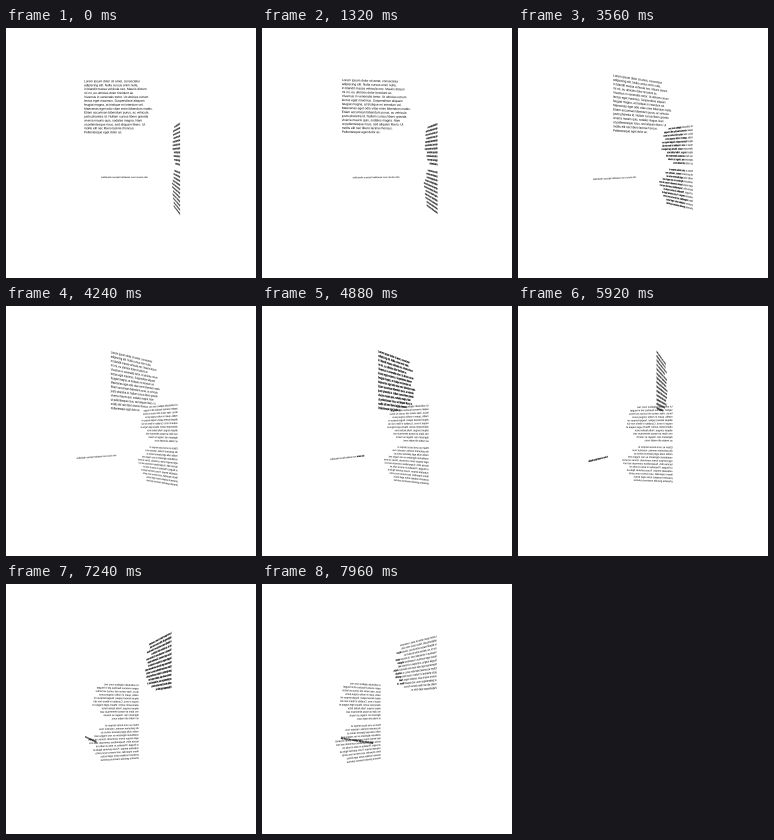
An HTML page with a canvas for the animation above (8 s loop, 250 by 250 pixels).

```html
<!DOCTYPE html>
<html lang="la">
<head>
<meta charset="utf-8">
<title>Turning text planes</title>
<style>
  html, body { margin: 0; width: 100%; height: 100%; overflow: hidden; background: #fff; }
  canvas { display: block; width: 250px; height: 250px; }
</style>
</head>
<body>
<canvas id="stage"></canvas>
<script>
const SIZE = 250, LOOP = 8000, STEP = 40;
const CENTER = { x: 127, y: 125 }, PERSPECTIVE = 310;
const EM = 100, OVERSAMPLE = 4;

const intro = `Lorem ipsum dolor sit amet, consectetur
adipiscing elit. Nulla cursus enim nulla,
in blandit massa vehicula nec. Mauris dictum
mi mi, eu ultricies dolor tincidunt ac.
Vivamus in venenatis tortor. Ut ultricies rutrum
lectus eget maximus. Suspendisse aliquam
feugiat magna, at tristique mi interdum vel.
Maecenas eget odio vitae enim bibendum mattis.
Etiam accumsan bibendum purus, ac vehicula
justo pharetra id. Nullam cursus libero gravida
viverra mauris quis, sodales magna. Nam
ut pellentesque risus, sed aliquam libero. Ut
mollis elit nec libero lacinia rhoncus.
Pellentesque eget dolor ac.`;

const body = `Ut sollicitudin dapibus nunc nec
sapien vivamus faucibus elit in feugiat
lacus, vitae varius nisl cursus eu lectus
mattis, quam in mollis congue purus
aliquet laoreet sapien, feugiat tempus mi
neque in eros. Curabitur in libero non dui
ullamcorper auctor. Mauris eget magna et
aliquet congue. Nulla facilisi tortor
nec diam at massa elementum sed
dignissim nisi. Integer ac mauris
ac mattis elit mattis nunc.

Etiam ac urna luctus tempor et
dis parturient montes, nascetur mus
mollis nulla eget placerat varius ac
vestibulum dignissim ex nec magna sed
eget tempor lorem commodo. Donec sit amet
lacinia nibh. Suspendisse commodo sed orci
ut feugiat. Phasellus in ante et nulla mi
vulputate tempor. Fusce pulvinar ligula at
libero imperdiet, sed viverra nunc porta
praesent sodales tortor eget lectus
pharetra gravida maximus pulvinar.`;

const label = "sollicitudin suscipit habitasse nunc iaculis odio";

// Each plane starts at (x, y, z); its lines run along direction (dx, dz).
const planes = [
  { text: body,  size: 2.93, leading: 3.82, x: 43.7,  y: -26.5, z: 22,  dx: 0, dz: -1 },
  { text: label, size: 2.62, leading: 0,    x: -36.6, y: 28.6,  z: -45, dx: 1, dz: 0 },
  { text: intro, size: 2.95, leading: 3.67, x: -45.8, y: -66.2, z: 20,  dx: 1, dz: 0 },
];

const canvas = document.getElementById("stage");
const screen = canvas.getContext("2d");
const ratio = window.devicePixelRatio || 1;
canvas.width = canvas.height = SIZE * ratio;
screen.imageSmoothingQuality = "high";

// Text is drawn large and reduced, so that lines glide without pixel snapping.
const buffer = document.createElement("canvas");
const detail = ratio * OVERSAMPLE;
buffer.width = buffer.height = SIZE * detail;
const ctx = buffer.getContext("2d");
ctx.font = `${EM}px "Liberation Sans", Arial, sans-serif`;
ctx.textRendering = "geometricPrecision";

// Split a plane into words with their offsets along the line, in world units.
function layout({ text, size }) {
  const unit = size / EM;
  return text.split("\n").flatMap((line, row) =>
    [...line.matchAll(/\S+/g)].map(({ 0: word, index }) => ({
      word,
      row,
      start: ctx.measureText(line.slice(0, index)).width * unit,
      width: ctx.measureText(word).width * unit,
    })));
}
for (const plane of planes) plane.words = layout(plane);

const angleAt = ms => 128 * (ms / 7960) ** 1.69 * Math.PI / 180;

function project(x, y, z, angle) {
  const cos = Math.cos(angle), sin = Math.sin(angle);
  const scale = PERSPECTIVE / (PERSPECTIVE + x * sin - z * cos);
  return {
    x: CENTER.x + (x * cos + z * sin) * scale,
    y: CENTER.y + y * scale,
    scale,
  };
}

function drawPlane(plane, angle) {
  const k = plane.size / EM * detail;
  for (const { word, row, start, width } of plane.words) {
    const at = u => project(plane.x + u * plane.dx, plane.y + row * plane.leading,
                            plane.z + u * plane.dz, angle);
    const a = at(start), b = at(start + width);
    const scale = (a.scale + b.scale) / 2;
    const ax = (b.x - a.x) / width, ay = (b.y - a.y) / width;
    ctx.setTransform(ax * k, ay * k, 0, scale * k, a.x * detail, a.y * detail);
    ctx.fillText(word, 0, 0);

    // Stems of foreshortened words widen until the line closes into a bar.
    const spread = 24 * (1 - Math.abs(ax) / scale - 0.35);
    if (spread > 0) {
      ctx.fillText(word, -spread, 0);
      ctx.fillText(word, spread, 0);
    }
  }
}

function render(now) {
  const time = Math.floor((now % LOOP) / STEP) * STEP;
  ctx.setTransform(1, 0, 0, 1, 0, 0);
  ctx.fillStyle = "#fff";
  ctx.fillRect(0, 0, buffer.width, buffer.height);
  ctx.fillStyle = "#000";
  for (const plane of planes) drawPlane(plane, angleAt(time));
  screen.drawImage(buffer, 0, 0, canvas.width, canvas.height);
}

let origin;
function tick(now) {
  origin ??= now;
  render(now - origin);
  requestAnimationFrame(tick);
}
requestAnimationFrame(tick);
</script>
</body>
</html>
```
